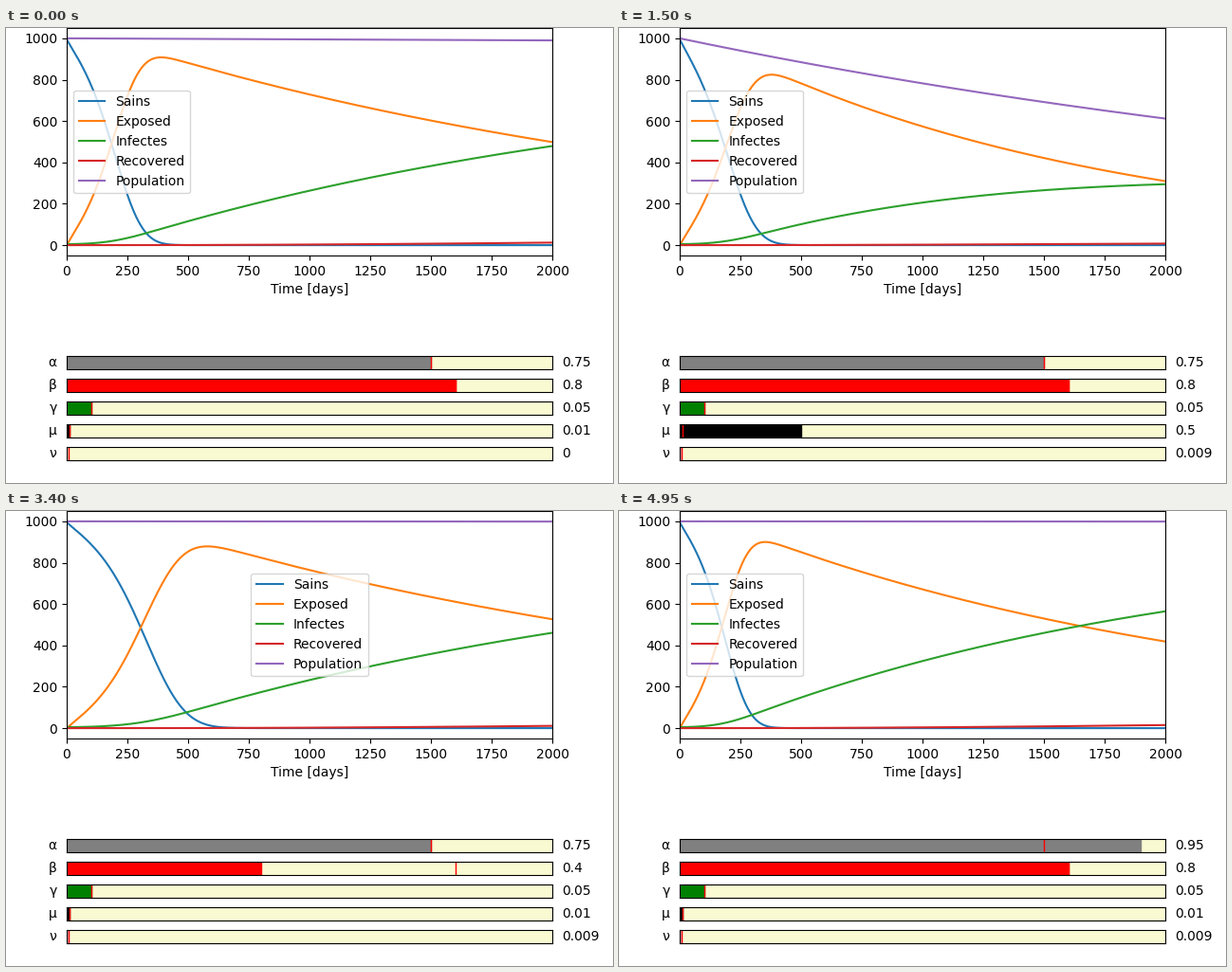
These frames come from a looping animation (640 px wide and 480 px high, 5000 ms). A matplotlib script:

```python
import numpy as np
import matplotlib.pyplot as plt
from matplotlib.animation import FuncAnimation
from matplotlib.patches import Rectangle

plt.rcParams["font.family"] = "DejaVu Sans"

DAYS = 2000
SWEEP = 20      # frames spent on each parameter
STEP = 0.05
# label, default value, slider maximum, bar colour
PARAMS = [
    ("α", 0.75, 1, "gray"),
    ("β", 0.8, 1, "red"),
    ("γ", 0.05, 1, "green"),
    ("μ", 0.01, 2, "black"),
    ("ν", 0.009, 2, "pink"),
]
FRAMES = SWEEP * len(PARAMS)


def sweep_values():
    """One row per parameter, one column per frame; swept from last to first."""
    values = np.repeat([[p[1]] for p in PARAMS], FRAMES, axis=1)
    for k in range(FRAMES):
        values[len(PARAMS) - 1 - k // SWEEP, k] = STEP * (k % SWEEP)
    return values


def slope(state, rates):
    s, e, i, r = state
    alpha, beta, gamma, mu, nu = rates
    caught = beta * s * i
    return np.array([
        nu * state.sum(axis=0) - caught - mu * s,
        caught - (alpha + mu) * e,
        alpha * e - (gamma + mu) * i,
        gamma * i - mu * r,
    ])


def solve(rates):
    """Runge-Kutta over all frames at once; the whole period is one time unit."""
    h = 1 / DAYS
    state = np.repeat([[995.0], [0.0], [5.0], [0.0]], FRAMES, axis=1)
    path = [state]
    for _ in range(DAYS):
        k1 = slope(state, rates)
        k2 = slope(state + h / 2 * k1, rates)
        k3 = slope(state + h / 2 * k2, rates)
        k4 = slope(state + h * k3, rates)
        state = state + h / 6 * (k1 + 2 * k2 + 2 * k3 + k4)
        path.append(state)
    path = np.array(path)
    return np.concatenate([path, path.sum(axis=1, keepdims=True)], axis=1)


class Bar:
    """A slider track with a filled bar, a default mark and a value label."""

    def __init__(self, fig, bottom, label, default, top, color):
        ax = fig.add_axes([0.1, bottom, 0.8, 0.03],
                          facecolor="lightgoldenrodyellow")
        ax.set(xlim=(0, top), ylim=(0, 1), xticks=[], yticks=[])
        self.fill = ax.add_patch(Rectangle((0, 0), default, 1, color=color))
        ax.axvline(default, color="r", lw=1)
        ax.text(-0.02, 0.5, label, transform=ax.transAxes,
                ha="right", va="center")
        self.text = ax.text(1.02, 0.5, "", transform=ax.transAxes,
                            ha="left", va="center")

    def set(self, value):
        self.fill.set_width(value)
        self.text.set_text(f"{value:.3g}")


values = sweep_values()
curves = solve(values)
days = np.arange(DAYS + 1)

fig = plt.figure(figsize=(6.4, 4.8), dpi=100)
ax = fig.add_axes([0.1, 0.5, 0.8, 0.5])
ax.set(xlim=(0, DAYS), ylim=(-50, 1050), xlabel="Time [days]")
names = ["Sains", "Exposed", "Infectes", "Recovered", "Population"]
lines = [ax.plot(days, curves[:, n, 0], label=name)[0]
         for n, name in enumerate(names)]
ax.legend(loc="best")
bars = [Bar(fig, 0.25 - 0.05 * n, *p) for n, p in enumerate(PARAMS)]


def update(k):
    for n, line in enumerate(lines):
        line.set_ydata(curves[:, n, k])
    for bar, value in zip(bars, values[:, k]):
        bar.set(value)
    return lines


anim = FuncAnimation(fig, update, frames=FRAMES, interval=50,
                     repeat=True, repeat_delay=0)
plt.show()
```
